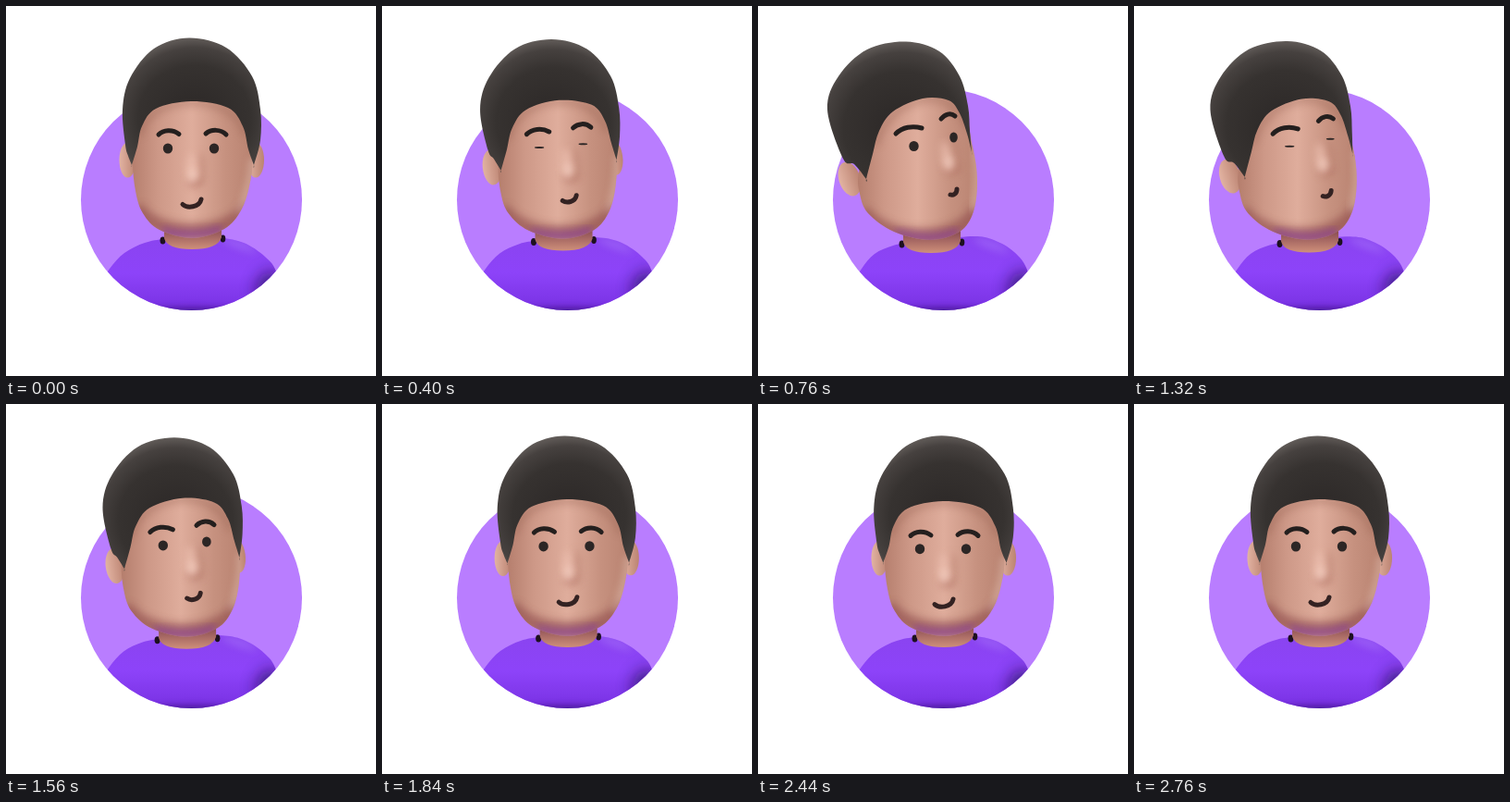
Write an HTML page that moves like this. It is 400 px wide and 400 px high and loops after 3040 ms.

```html
<!DOCTYPE html>
<html lang="en">
<head>
<meta charset="utf-8">
<title>Avatar</title>
<style>
html, body { margin: 0; width: 100%; height: 100%; overflow: hidden; background: #fff; }
svg { display: block; width: 100vw; height: 100vh; }
</style>
</head>
<body>
<svg viewBox="0 0 400 400">
  <defs>
    <clipPath id="disc"><circle cx="200.5" cy="209.5" r="119.5"/></clipPath>
    <clipPath id="faceClip"><path class="face"/></clipPath>
    <clipPath id="bodyClip"><path class="body"/></clipPath>
    <linearGradient id="skin">
      <stop offset="0" stop-color="#b57e6d"/>
      <stop offset=".22" stop-color="#cd9887"/>
      <stop offset=".5" stop-color="#dfad9c"/>
      <stop offset=".78" stop-color="#c6917f"/>
      <stop offset="1" stop-color="#b98371"/>
    </linearGradient>
    <linearGradient id="neckSkin" x2="0" y2="1">
      <stop offset=".3" stop-color="#8d4f55"/>
      <stop offset="1" stop-color="#cf907a"/>
    </linearGradient>
    <linearGradient id="earSkin">
      <stop offset="0" stop-color="#e2b3a2"/>
      <stop offset="1" stop-color="#bb8371"/>
    </linearGradient>
    <radialGradient id="hairFill" cx=".52" cy=".62" r=".68">
      <stop offset="0" stop-color="#2b2726"/>
      <stop offset=".6" stop-color="#363230"/>
      <stop offset=".8" stop-color="#46413f"/>
      <stop offset="1" stop-color="#77716d"/>
    </radialGradient>
    <linearGradient id="shirt" x2="0" y2="1">
      <stop offset="0" stop-color="#8a44f0"/>
      <stop offset=".4" stop-color="#8d43f9"/>
      <stop offset=".75" stop-color="#7c34e6"/>
      <stop offset="1" stop-color="#5a20b4"/>
    </linearGradient>
    <filter id="soft" x="-100%" y="-100%" width="300%" height="300%"><feGaussianBlur stdDeviation="4"/></filter>
    <filter id="wide" x="-100%" y="-100%" width="300%" height="300%"><feGaussianBlur stdDeviation="9"/></filter>
  </defs>

  <circle cx="200.5" cy="209.5" r="119.5" fill="#b97dff"/>
  <g clip-path="url(#disc)">
    <path class="body" fill="url(#shirt)"/>
    <g clip-path="url(#bodyClip)">
      <ellipse cx="287" cy="307" rx="16" ry="20" fill="#220a55" opacity=".75" filter="url(#wide)"/>
      <ellipse cx="202" cy="334" rx="60" ry="7" fill="#2b0d6b" opacity=".7" filter="url(#soft)"/>
      <ellipse cx="252" cy="258" rx="20" ry="4" fill="#b68cff" opacity=".4" filter="url(#soft)" transform="rotate(20 252 258)"/>
    </g>
  </g>
  <g id="neck">
    <ellipse cx="169.500" cy="253.500" rx="3" ry="4" fill="#1d1020"/>
    <ellipse cx="234.500" cy="251.500" rx="2.800" ry="4" fill="#1d1020"/>
    <path d="M171 232H233V250Q229 263 201 263Q174 263 171 251Z" fill="url(#neckSkin)"/>
  </g>
  <ellipse id="earR" rx="9" ry="19" fill="url(#earSkin)"/>
  <ellipse id="earL" ry="19" fill="url(#earSkin)"/>

  <path class="face" fill="url(#skin)"/>
  <g clip-path="url(#faceClip)">
    <path id="jaw" fill="none" stroke="#8d4a4c" stroke-width="17" opacity=".6" filter="url(#soft)"/>
    <path id="chin" fill="none" stroke="#7b2fa8" stroke-width="7" opacity=".65" filter="url(#soft)"/>
    <path id="rim" fill="none" stroke="#f3d8cc" stroke-width="5" opacity=".6" filter="url(#soft)"/>
    <path id="fringe" fill="none" stroke="#8f5b4c" stroke-width="8" opacity=".35" filter="url(#soft)"/>
  </g>
  <g id="nose">
    <ellipse cx="3" cy="14" rx="8" ry="6" fill="#a9685a" opacity=".6" filter="url(#soft)"/>
    <ellipse cx="10" cy="0" rx="4" ry="18" fill="#b87f6e" opacity=".55" filter="url(#soft)"/>
    <ellipse rx="5" ry="17" fill="#edc0b0" opacity=".8" filter="url(#soft)"/>
    <ellipse cx="1" cy="7" rx="4.500" ry="6" fill="#f8d6c9" opacity=".75" filter="url(#soft)"/>
  </g>
  <path id="hair" fill="url(#hairFill)"/>
  <g fill="none" stroke="#241f1e" stroke-width="5" stroke-linecap="round">
    <path id="browL"/>
    <path id="browR"/>
    <path id="mouth" stroke="#332222"/>
  </g>
  <g fill="#2c2625">
    <ellipse id="eyeL"/>
    <ellipse id="eyeR"/>
  </g>
</svg>
<script>
const LOOP = 3040, STEP = 40;
const $ = id => document.getElementById(id);
const clamp = v => Math.min(1, Math.max(0, v));
const span = (t, a, b) => clamp((t - a) / (b - a));
const ease = v => (1 - Math.cos(Math.PI * v)) / 2;
const lerp = (a, b, p) => a + (b - a) * p;
const nums = s => s.match(/-?[\d.]+/g).map(Number);

// Each shape: facing front, then tilted aside
const shapes = {
  hair: [
    "136,172 136,172 132,162 129,150 126,112 134,78 160,46 198,34.500 238,45 266,76 275,112 275,145 268,172 268,172 262,155 256,130 240,110 200,103 162,111 147,130 142,152",
    "117,187 117,187 104,171 92,165 75,112 87,76 118,47 160,38.500 196,49 218,76 227,108 229,135 231,158 231,158 226,138 218,116 206,102 178,100 146,114 131,135 124,160"],
  face: [
    "142,120 200,95 258,120 266,165 263,195 254,221 236,241 202,251 166,242 148,224 140,200 137,165",
    "122,140 175,92 218,105 232,152 237,188 233,222 218,244 186,253 147,244 119,224 110,203 109,180"],
  body: [
    "90,340 104,300 112,284 128,267 150,256 172,252 202,252 232,251 257,256 280,271 293,290 302,340",
    "90,340 104,300 112,284 126,268 146,259 165,256 200,252 234,249 255,253 277,266 292,288 302,340"]
};
for (const k in shapes) shapes[k] = shapes[k].map(nums);

const lines = {
  browL: ["M165 139C170 134 180 133 187 138.500", "M149 138C156 131 167 129 177 132"],
  browR: ["M216 138C222 133 232 133 238 139", "M198 122C202 117 208 115 213 119"],
  mouth: ["M191 214.500C196 219 209 218 211 209", "M208 204C211 205 215 203 215 198"],
  jaw: ["M140 218C160 252 244 252 262 216", "M112 222C135 256 218 260 238 220"],
  chin: ["M168 243Q202 252 234 241", "M148 245Q185 256 217 244"],
  rim: ["M267 165Q266 196 252 224", "M236 155Q241 190 233 222"],
  fringe: ["M144 140C152 92 250 92 259 140", "M127 150C140 98 210 80 226 130"]
};

function mixPath([a, b], p) {
  const to = nums(b);
  let i = 0;
  return a.replace(/[\d.]+/g, v => lerp(+v, to[i++], p).toFixed(2));
}

function mixPoints([a, b], p) {
  const out = [];
  for (let i = 0; i < a.length; i += 2)
    out.push([lerp(a[i], b[i], p), lerp(a[i + 1], b[i + 1], p)]);
  return out;
}

// Closed smooth curve; a doubled point makes a corner
function smooth(pts) {
  const n = pts.length, at = i => pts[(i + n) % n];
  let d = "M" + pts[0];
  for (let i = 0; i < n; i++) {
    const [a, b, c, e] = [at(i - 1), at(i), at(i + 1), at(i + 2)];
    d += "C" + [0, 1].map(k => b[k] + (c[k] - a[k]) / 6)
      + " " + [0, 1].map(k => c[k] - (e[k] - b[k]) / 6) + " " + c;
  }
  return d + "Z";
}

function set(el, attrs) {
  for (const k in attrs) el.setAttribute(k, attrs[k]);
}

function setAll(name, d) {
  document.querySelectorAll("." + name).forEach(el => el.setAttribute("d", d));
}

function draw(t) {
  const out = ease(Math.pow(span(t, 200, 760), 0.82));
  const back = ease(span(t, 1120, 1920));
  const p = out - back;
  const nod = ease(span(t, 1880, 2200)) - ease(span(t, 2240, 2760));
  const blink = Math.max(...[400, 1320].map(c => clamp(1.4 - Math.abs(t - c) / 90)));
  const bulge = -10 * p * (1 - p);
  const shift = dy => `translate(${bulge} ${dy * nod})`;

  const hair = mixPoints(shapes.hair, p).map(([x, y], i) =>
    [200 + (x - 200) * (1 + 0.014 * nod), y + (i > 13 ? 3 * nod : -0.5 * nod)]);
  set($("hair"), { d: smooth(hair) });
  setAll("face", smooth(mixPoints(shapes.face, p)));
  setAll("body", smooth(mixPoints(shapes.body, p)));
  for (const k in lines) set($(k), { d: mixPath(lines[k], p) });

  set($("browL"), { transform: shift(5) });
  set($("browR"), { transform: shift(5) });
  set($("mouth"), { transform: shift(3) });
  set($("fringe"), { transform: shift(3) });
  set($("neck"), { transform: `translate(${-14 * p} ${4 * p})` });
  set($("nose"), {
    transform: `${shift(4)} translate(${lerp(201, 204, p)} ${lerp(176, 163, p)}) rotate(${-10 * p})`
  });

  const eye = (id, x, y, rx) => set($(id), {
    cx: x, cy: y, rx, ry: lerp(5.5, 1, blink), transform: shift(4)
  });
  eye("eyeL", lerp(175, 168.5, p), lerp(154, 151.5, p), 5.2);
  eye("eyeR", lerp(225, 211.5, p), lerp(154, 142, p), lerp(5.2, 4.3, p));

  const ear = (id, x, y) => set($(id), {
    transform: `translate(${x} ${y}) rotate(${-18 * p})`
  });
  ear("earL", lerp(131.5, 99, p), lerp(166.5, 187, p));
  ear("earR", lerp(270, 222, p), lerp(166.5, 160, p));
  set($("earL"), { rx: lerp(9, 11.5, p) });
}

const start = performance.now();
function tick() {
  const t = (performance.now() - start) % LOOP;
  draw(Math.floor(t / STEP) * STEP);
  requestAnimationFrame(tick);
}
tick();
</script>
</body>
</html>
```
